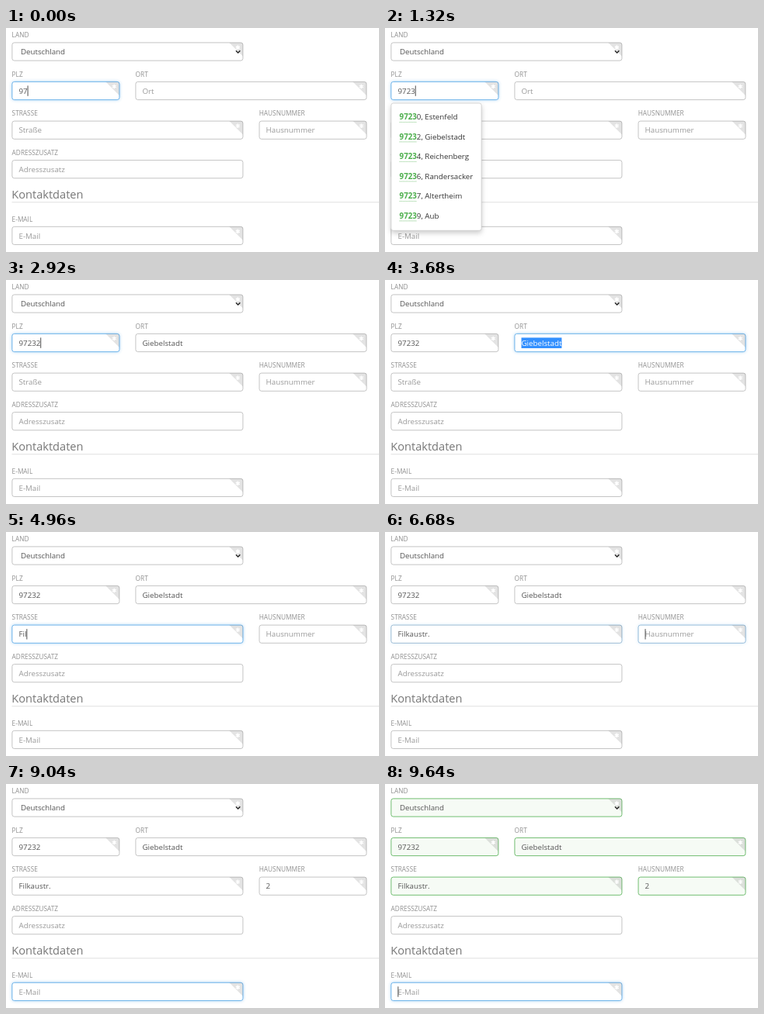
An HTML page that plays this animation: 480 by 289 pixels, repeating every 10 s.

```html
<!DOCTYPE html>
<html lang="de">
<head>
<meta charset="utf-8">
<title>Adressformular</title>
<style>
html, body { margin: 0; width: 100%; height: 100%; overflow: hidden; background: #fff; }
svg { display: block; font: 9.75px "Open Sans", sans-serif; }
text { white-space: pre; }
.label { font-size: 8.3px; fill: #909090; }
.heading { font-size: 14.6px; fill: #777; }
.glow { fill: #66afe9; filter: blur(2.2px); }
.box { stroke-width: .9; }
.corner { fill: rgba(90, 90, 90, .17); }
.star { stroke: #fff; stroke-width: 1.5; }
.arrow { fill: none; stroke: #222; stroke-width: 1.4; }
.mark { fill: #3390ff; }
.caret { fill: #222; }
.menu { fill: #fff; stroke: #ccc; stroke-width: .8; filter: drop-shadow(0 3px 3px rgba(0, 0, 0, .2)); }
.hover { fill: #eaf5ea; }
.item { fill: #333; }
.hit { fill: #4cae4c; font-weight: bold; }
.dots { stroke: #4cae4c; stroke-width: .8; stroke-dasharray: 1.2 .8; opacity: .75; }
</style>
</head>
<body>
<svg width="480" height="289" viewBox="0 0 480 289"></svg>
<script>
const LOOP = 10000, STEP = 40, FADE = 150;
const GRAY = [190, 190, 190], BLUE = [102, 175, 233], GREEN = [98, 183, 98];
const WHITE = [255, 255, 255], MINT = [246, 251, 245];
const svg = document.querySelector("svg");

function add(parent, tag, attrs, text) {
  const el = document.createElementNS("http://www.w3.org/2000/svg", tag);
  for (const k in attrs) el.setAttribute(k, attrs[k]);
  if (text) el.textContent = text;
  return parent.appendChild(el);
}
const show = (el, on) => el.setAttribute("visibility", on ? "visible" : "hidden");
const mix = (a, b, p) => a.map((v, i) => v + (b[i] - v) * p);
const rgb = c => `rgb(${c.map(Math.round)})`;
const within = (t, spans) => spans.some(([a, b]) => t >= a && t < b);
function ramp(t, start) {
  const p = Math.min(1, Math.max(0, (t - start) / FADE));
  return p * p * (3 - 2 * p);
}

// focus: [gain, loss]; caret: visible spans; typed: [time, value]
const fields = [
  { label: "LAND", x: 7.9, y: 30.5, w: 297, required: true, valid: true, select: true,
    typed: [[0, "Deutschland"]] },
  { label: "PLZ", x: 7.9, y: 81, w: 138, required: true, valid: true,
    focus: [-FADE, 3510], caret: [[0, 1400], [2000, 2560], [2920, 3520]],
    typed: [[0, "97"], [280, "972"], [760, "9723"], [2920, "97232"]] },
  { label: "ORT", hint: "Ort", x: 166.9, y: 81, w: 297, required: true, valid: true,
    focus: [3510, 3700], marked: [[3520, 3720]], typed: [[2920, "Giebelstadt"]] },
  { label: "STRASSE", hint: "Straße", x: 7.9, y: 131.7, w: 297, required: true, valid: true,
    focus: [3700, 6600], caret: [[3720, 4320], [4720, 5560], [5760, 6400]],
    typed: [[4720, "F"], [4800, "Fi"], [4960, "Fil"], [5760, "Filkau"], [5800, "Filkaustr."]] },
  { label: "HAUSNUMMER", hint: "Hausnummer", x: 326, y: 131.7, w: 138, required: true, valid: true,
    focus: [6600, 8010], caret: [[6600, 7760]], typed: [[7160, "2"]] },
  { label: "ADRESSZUSATZ", hint: "Adresszusatz", x: 7.9, y: 182.2, w: 297,
    focus: [8010, 8440], caret: [[8040, 8440]] },
  { label: "E-MAIL", hint: "E-Mail", x: 7.9, y: 267.9, w: 297, required: true,
    focus: [8440, LOOP + FADE], caret: [[8440, 9040], [9640, LOOP]] }
];

function buildField(f) {
  const { x, y, w } = f, top = y - 11.6, right = x + w;
  const frame = { x, y: top, width: w, height: 23.2, rx: 2.8 };
  f.textX = x + (f.select ? 11 : 8.6);
  add(svg, "text", { class: "label", x: x - .3, y: y - 18.3 }, f.label);
  f.glow = add(svg, "rect", { class: "glow", ...frame });
  f.box = add(svg, "rect", { class: "box", ...frame });
  if (f.required) {
    add(svg, "path", { class: "corner", d: `M${right - 17.5} ${top}h15q2.5 0 2.5 2.5v15z` });
    add(svg, "path", { class: "star",
      d: `M${right - 6.6} ${top + 3.3}v5.6m-2.5 -4.2l5 2.8m0 -2.8l-5 2.8` });
  }
  if (f.select) add(svg, "path", { class: "arrow", d: `M${right - 9} ${y - 1.2}l2.7 2.8l2.7 -2.8` });
  f.mark = add(svg, "rect", { class: "mark", x: f.textX, y: y - 6.6, height: 13.6 });
  f.text = add(svg, "text", { x: f.textX, y: y + 3.6 });
  f.bar = add(svg, "rect", { class: "caret", y: y - 6.6, width: .8, height: 13.4 });
}

function drawField(f, t) {
  const focus = f.focus ? ramp(t, f.focus[0]) - ramp(t, f.focus[1]) : 0;
  const valid = f.valid ? ramp(t, 9220) : 0;
  f.glow.setAttribute("opacity", .65 * focus);
  f.box.setAttribute("stroke", rgb(mix(mix(GRAY, BLUE, focus), GREEN, valid)));
  f.box.setAttribute("fill", rgb(mix(WHITE, MINT, valid)));

  const value = (f.typed || []).reduce((s, [at, v]) => t >= at ? v : s, "");
  const marked = within(t, f.marked || []);
  f.text.textContent = value || f.hint;
  f.text.setAttribute("fill", marked ? "#fff" : value ? "#555" : "#999");
  const width = value ? f.text.getComputedTextLength() : 0;
  f.mark.setAttribute("width", width);
  show(f.mark, marked);
  f.bar.setAttribute("x", f.textX + width);
  show(f.bar, within(t, f.caret || []));
}

fields.forEach(buildField);
add(svg, "text", { class: "heading", x: 7.3, y: 219.8 }, "Kontaktdaten");
add(svg, "path", { d: "M7.5 224.8H480", stroke: "#ddd", "stroke-width": .9 });

const menu = add(svg, "g");
add(menu, "rect", { class: "menu", x: 7.9, y: 97, width: 116.2, height: 164.3, rx: 2.8 });
const hover = add(menu, "rect", { class: "hover", x: 13, y: 127.6, width: 105, height: 25.5 });
["0, Estenfeld", "2, Giebelstadt", "4, Reichenberg", "6, Randersacker", "7, Altertheim", "9, Aub"]
  .forEach((rest, i) => {
    const y = 114.8 + 25.5 * i;
    const item = add(menu, "text", { class: "item", x: 18.6, y: y + 3.6 });
    add(item, "tspan", { class: "hit" }, "9723");
    add(item, "tspan", {}, rest);
    add(menu, "path", { class: "dots", d: `M18.6 ${y + 6.6}h22.4` });
  });

function draw(now) {
  const t = Math.floor(now % LOOP / STEP) * STEP;
  fields.forEach(f => drawField(f, t));
  const open = within(t, [[1320, 2920]]);
  show(menu, open);
  show(hover, open && t >= 2560);
}

let start;
function tick(now) {
  start ??= now;
  draw(now - start);
  requestAnimationFrame(tick);
}
draw(0);
requestAnimationFrame(tick);
</script>
</body>
</html>
```
